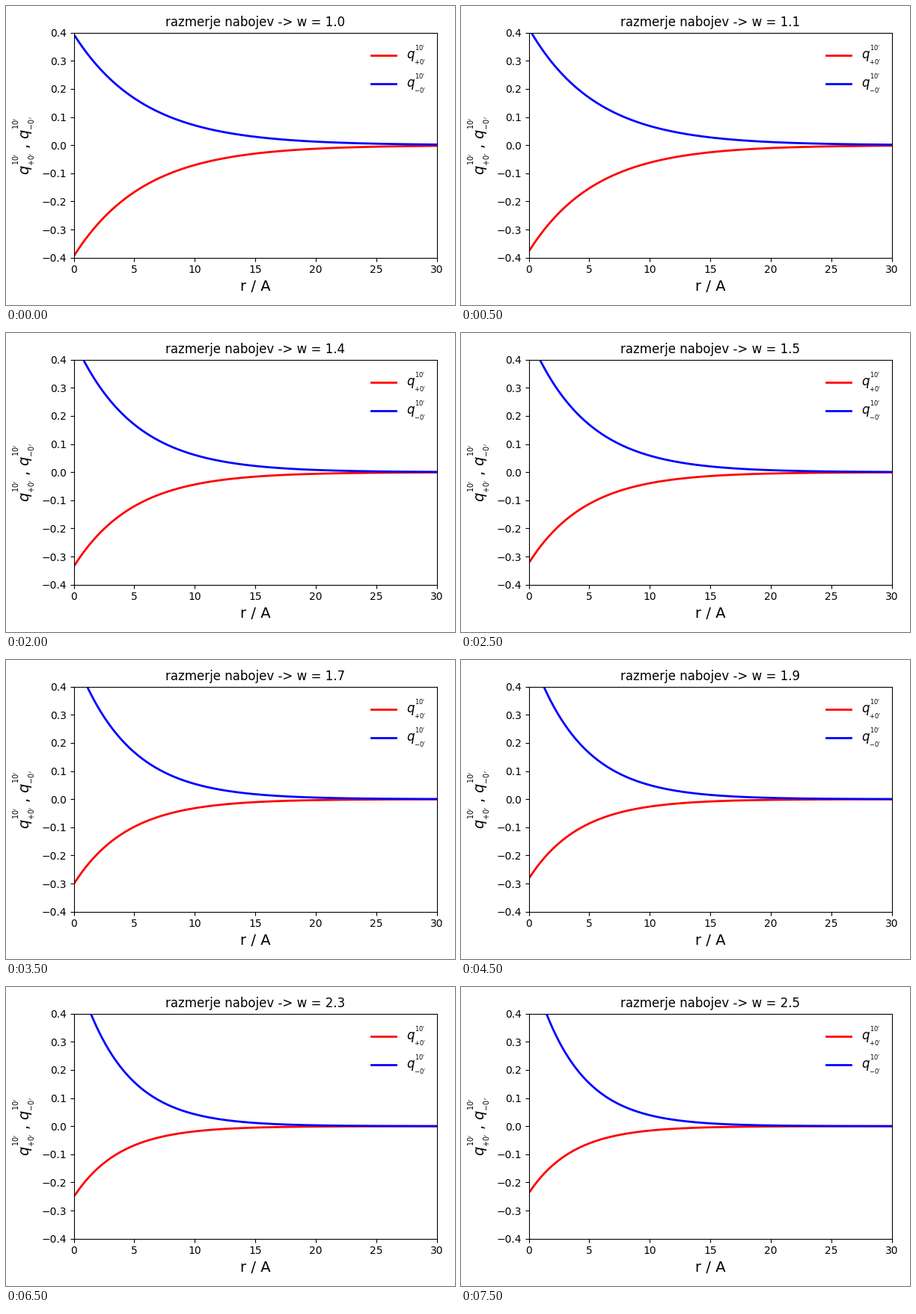
Write a matplotlib script that moves like this. It is 600 px wide and 400 px high and loops after 8 s.

```python
import numpy as np
import matplotlib.pyplot as plt
from matplotlib.animation import FuncAnimation

FRAMES = 16
STEP_MS = 500
DEBYE = 5.8
AMPLITUDE = 0.395

PLUS = r"$q^{^{10'}}_{_{+0'}}$"
MINUS = r"$q^{^{10'}}_{_{-0'}}$"

plt.rcParams["font.family"] = "DejaVu Sans"

r = np.linspace(0.1, 30, 300)


def charge(w):
    """Screened charge profile for charge ratio w."""
    peak = AMPLITUDE * 2 / (1 + w) * w ** 0.06
    return peak * np.exp(-r * np.sqrt(w) / DEBYE)


fig, ax = plt.subplots(figsize=(6, 4), dpi=100)
fig.subplots_adjust(left=90.5 / 600, right=576 / 600,
                    bottom=63.3 / 400, top=364.3 / 400)

plus_line, = ax.plot(r, -charge(1), color="red", lw=2, label=PLUS)
minus_line, = ax.plot(r, charge(1), color="blue", lw=2, label=MINUS)
ax.set_xlim(0, 30)
ax.set_ylim(-0.4, 0.4)
ax.set_xlabel("r / A", fontsize=14)
ax.set_ylabel(f"{PLUS} , {MINUS}", fontsize=14)
ax.legend(loc="upper right", fontsize=12, frameon=False)
title = ax.set_title("")


def update(i):
    w = 1 + i / 10
    q = charge(w)
    plus_line.set_ydata(-q)
    minus_line.set_ydata(w * q)
    title.set_text(f"razmerje nabojev -> w = {w:.1f}")
    return plus_line, minus_line, title


anim = FuncAnimation(fig, update, frames=FRAMES, interval=STEP_MS,
                     repeat=True, repeat_delay=0)
plt.show()
```
